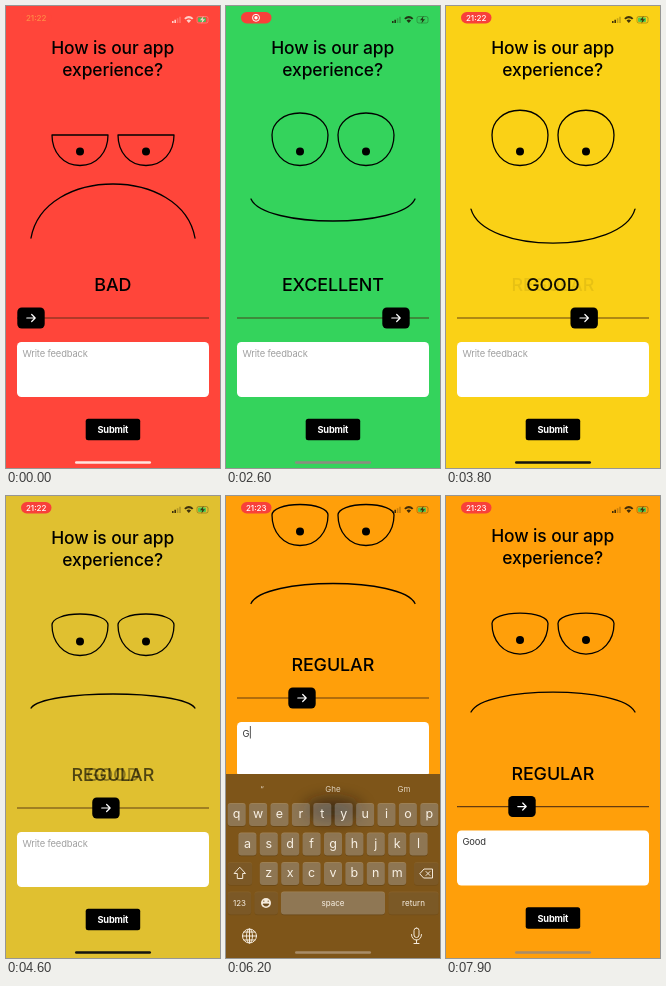
An HTML page for the animation above (8000 ms loop, 214 by 462 pixels).

```html
<!DOCTYPE html>
<html lang="en">
<head>
<meta charset="utf-8">
<title>Feedback slider</title>
<style>
html, body { margin: 0; width: 100%; height: 100%; overflow: hidden; }
svg { display: block; width: 100vw; height: 100vh; font-family: Inter, Roboto, sans-serif; }
.mid { text-anchor: middle; }
.title { font-size: 17.4px; font-weight: 500; letter-spacing: -.1px; }
.word { font-size: 17.9px; font-weight: 500; letter-spacing: -.1px; }
.line { fill: none; stroke: #000; stroke-width: 1.3; stroke-linecap: round; stroke-linejoin: round; }
.pen { fill: none; stroke: #f4eadb; stroke-linecap: round; stroke-linejoin: round; }
#keys text { fill: #f8f0e4; font-size: 12.5px; }
#keys .small { font-size: 8px; }
.upper { text-transform: uppercase; }
</style>
</head>
<body>
<svg viewBox="0 0 214 462" preserveAspectRatio="none">
  <defs><filter id="blur" x="-50%" y="-100%" width="200%" height="300%"><feGaussianBlur stdDeviation="8"/></filter></defs>
  <rect id="bg" width="214" height="462"/>
  <g id="page">
    <text class="mid title" x="106.7" y="47.5">How is our app</text>
    <text class="mid title" x="106.7" y="69.5">experience?</text>
    <path id="eyes" class="line"/>
    <circle cx="74" cy="145.5" r="4"/><circle cx="140" cy="145.5" r="4"/>
    <path id="mouth" class="line"/>
    <g id="words"></g>
    <path d="M11 312H203" stroke="#4a2a10" stroke-width="1.2" opacity=".85"/>
    <g id="knob">
      <rect x="-13.7" y="301.5" width="27.4" height="21" rx="4.5"/>
      <path d="M-4.2 312H4M.7 308.5L4.2 312L.7 315.5" class="pen" style="stroke:#fff;stroke-width:1.2"/>
    </g>
    <rect x="11" y="336" width="192" height="55" rx="4.5" fill="#fff"/>
    <text id="entry" x="16.5" y="350.5" font-size="9.4" letter-spacing="-.15"></text>
    <rect id="caret" y="340" width="1" height="12.5" fill="#555"/>
    <rect x="79.7" y="412.8" width="54.5" height="21.5" rx="2.5"/>
    <text class="mid" x="106.9" y="427.3" fill="#fff" font-size="9.2" font-weight="700" letter-spacing="-.15">Submit</text>
  </g>
  <g id="board">
    <rect y="278" width="214" height="190" fill="#7e5519"/>
    <ellipse cx="107" cy="314" rx="28" ry="11" fill="#1c1814" opacity=".65" filter="url(#blur)"/>
    <g id="keys"></g>
    <g class="pen">
      <path d="M14 371.5L19.5 377.5H16.7V382.5H11.3V377.5H8.5Z"/>
      <path d="M194 377.5L198 373H206.5V382H198ZM200 375.5L204 379.5M204 375.5L200 379.5"/>
      <circle cx="23.5" cy="440" r="7"/><ellipse cx="23.5" cy="440" rx="3" ry="7"/>
      <path d="M16.5 440H30.5M18 436H29M18 444H29M23.5 433V447"/>
      <rect x="188" y="432" width="5" height="9.5" rx="2.5"/>
      <path d="M185.5 438.5C185.5 446 195.5 446 195.5 438.5M190.5 444V447.5M188 447.5H193"/>
    </g>
    <circle cx="40" cy="407" r="5" fill="#f4eadb"/>
    <path d="M37 408A3.2 3.2 0 0 0 43 408ZM37.8 404.5V406M42.2 404.5V406" fill="#6b4a1c" stroke="#6b4a1c" stroke-width=".8"/>
  </g>
  <rect id="pill" x="15" y="6" width="30.5" height="11.5" rx="5.7"/>
  <text id="clock" class="mid" x="30.2" y="14.7" font-size="8" font-weight="500"></text>
  <g id="rec"><circle cx="30" cy="11.8" r="3.5" fill="none" stroke="#fff"/><circle cx="30" cy="11.8" r="1.7" fill="#fff"/></g>
  <g id="status" opacity=".85">
    <path d="M166 15h1.6v2h-1.6zM168.4 13.7H170v3.3h-1.6z"/>
    <path d="M170.8 12.2h1.6V17h-1.6zM173.2 10.7h1.6V17h-1.6z" opacity=".3"/>
    <path d="M178.2 12.2Q182.8 8 187.4 12.2L186 13.6Q182.8 10.8 179.6 13.6ZM180.5 14.5Q182.8 12.6 185.1 14.5L182.8 16.9Z"/>
    <rect x="191" y="10.5" width="11" height="6.5" rx="1.8" fill="none" stroke="currentColor" stroke-width=".6" opacity=".6"/>
    <rect x="192" y="11.5" width="8" height="4.5" rx="1" fill="#36c95a"/>
    <path d="M197.6 10L194 14.3H196.3L195.4 17.6L199 13.2H196.7Z"/>
  </g>
  <rect id="home" x="69" y="455.2" width="76" height="2.5" rx="1.25"/>
</svg>
<script>
const LOOP = 8000;
const el = id => document.getElementById(id);
const set = (id, attrs) => { for (const k in attrs) el(id).setAttribute(k, attrs[k]); };
const clamp = v => Math.min(1, Math.max(0, v));
const lerp = (a, b, p) => a + (b - a) * p;
const easeOut = v => 1 - (1 - clamp(v)) ** 3;

// x: slider stop; lid: top of the eyes; end, mid: height of the mouth's corners and centre
const bad = { x: 25, lid: 129, end: 232, mid: 178, bg: '#ff453a' };
const regular = { x: 76, lid: 118.5, end: 217.5, mid: 197.5, bg: '#ff9f0a' };
const good = { x: 143, lid: 102.5, end: 202, mid: 242, bg: '#fdd313' };
const excellent = { x: 170, lid: 107, end: 193, mid: 215, bg: '#34d35c' };
const doubtful = { x: 100, lid: 118, end: 212, mid: 198, bg: '#e0c030' };

const path = [[0, bad], [920, bad], [1120, regular], [1700, good], [2300, excellent],
  [3050, excellent], [3700, good], [4600, doubtful], [5000, regular], [LOOP, regular]];

const words = [['BAD', bad], ['REGULAR', regular], ['GOOD', good], ['EXCELLENT', excellent]];
el('words').innerHTML = words.map(([w]) => `<text class="mid word" x="106.8" y="285">${w}</text>`).join('');

function key(x, y, w, label, kind = 'letter') {
  const plain = kind === 'letter' || label === 'space';
  return `<rect x="${x}" y="${y + .8}" width="${w}" height="23" rx="3" opacity="${plain ? .2 : .1}"/>
    <rect x="${x}" y="${y}" width="${w}" height="23" rx="3" fill="#fff" opacity="${plain ? .27 : .07}"/>
    <text class="mid ${kind}" x="${x + w / 2}" y="${y + (kind === 'small' ? 14.3 : 15.3)}">${label}</text>`;
}
const rows = ['qwertyuiop', 'asdfghjkl', 'zxcvbnm'].map((row, r) =>
  [...row].map((c, i) => key(107 - row.length * 10.7 + 1.7 + i * 21.4, 307 + 29.5 * r, 18, c)).join(''));
el('keys').innerHTML = rows.join('')
  + key(1.7, 366, 24.5, '', 'small') + key(188, 366, 24.5, '', 'small')
  + key(1.7, 395.5, 23.5, '123', 'small') + key(28.5, 395.5, 23.5, '', 'small')
  + key(55, 395.5, 104, 'space', 'small') + key(162.5, 395.5, 50, 'return', 'small')
  + [36, 107, 178].map(x => `<text class="mid small hint" x="${x}" y="296" opacity=".8"></text>`).join('');
const letters = document.querySelectorAll('.letter'), hints = document.querySelectorAll('.hint');

function drawFace(t) {
  const i = path.findIndex(([time]) => time > t);
  const [t0, a] = path[i - 1], [t1, b] = path[i], p = (t - t0) / (t1 - t0);
  const [x, lid, end, mid] = ['x', 'lid', 'end', 'mid'].map(k => lerp(a[k], b[k], p));

  el('bg').style.fill = `color-mix(in srgb, ${b.bg} ${p * 100}%, ${a.bg})`;
  set('knob', { transform: `translate(${x} 0)` });

  // Each word fades out towards the neighbouring slider stops.
  words.forEach(([, stop], n) => {
    const next = words[n + Math.sign(x - stop.x)];
    const fade = next ? (x - stop.x) / (next[1].x - stop.x) : 0;
    el('words').children[n].setAttribute('opacity', clamp(1 - fade));
  });

  const side = lerp(129, lid, .55);
  const eye = o => `M${46 + o} 129C${46 + o} ${side} ${57.5 + o} ${lid} ${74 + o} ${lid}`
    + `S${102 + o} ${side} ${102 + o} 129C${102 + o} 146 ${91 + o} 159.5 ${74 + o} 159.5S${46 + o} 146 ${46 + o} 129Z`;
  set('eyes', { d: eye(0) + eye(66) });
  const pull = (mid - end / 4) / .75;
  set('mouth', { d: `M25 ${end}C38 ${pull} 176 ${pull} 189 ${end}` });
}

function drawTyping(t) {
  const lift = easeOut((t - 5500) / 400) - easeOut((t - 7400) / 657);
  set('page', { transform: `translate(0 ${-110 * lift})` });
  set('board', { transform: `translate(0 ${188 * (1 - lift)})` });

  const entry = el('entry'), typed = 'Good'.slice(0, Math.max(0, Math.floor((t - 5850) / 300)));
  entry.textContent = typed || 'Write feedback';
  set('entry', { fill: typed ? '#333' : '#a0a0a0' });
  set('caret', {
    x: typed ? 17 + entry.getComputedTextLength() : 16.5,
    opacity: t > 5500 && t < 7400 ? 1 : 0,
  });
  letters.forEach(k => k.classList.toggle('upper', !typed));
  const guesses = !typed ? ['I', 'The', 'I’m']
    : typed === 'G' ? ['“', 'Ghe', 'Gm'] : [`“${typed}”`, 'Goods', 'Goodbye'];
  hints.forEach((h, i) => h.textContent = guesses[i]);
}

function drawStatus(t) {
  const early = t < 500, recording = !early && t < 3300;
  set('pill', { fill: early ? '#ff453a' : '#f8403a' });
  set('clock', { fill: early ? '#ff8c46' : '#fff', opacity: recording ? 0 : 1 });
  el('clock').textContent = t < 5600 ? '21:22' : '21:23';
  set('rec', { opacity: recording ? 1 : 0 });
  const ink = t < 1000 ? '#ffe9e2' : '#201808';
  set('status', { fill: ink, color: ink });
  set('home', { fill: t < 1000 ? '#ffe4de' : recording ? '#8c8c80' : t < 5500 ? '#14140f' : '#a88c68' });
}

function tick() {
  const t = performance.now() % LOOP;
  drawFace(t);
  drawTyping(t);
  drawStatus(t);
  requestAnimationFrame(tick);
}
tick();
</script>
</body>
</html>
```
